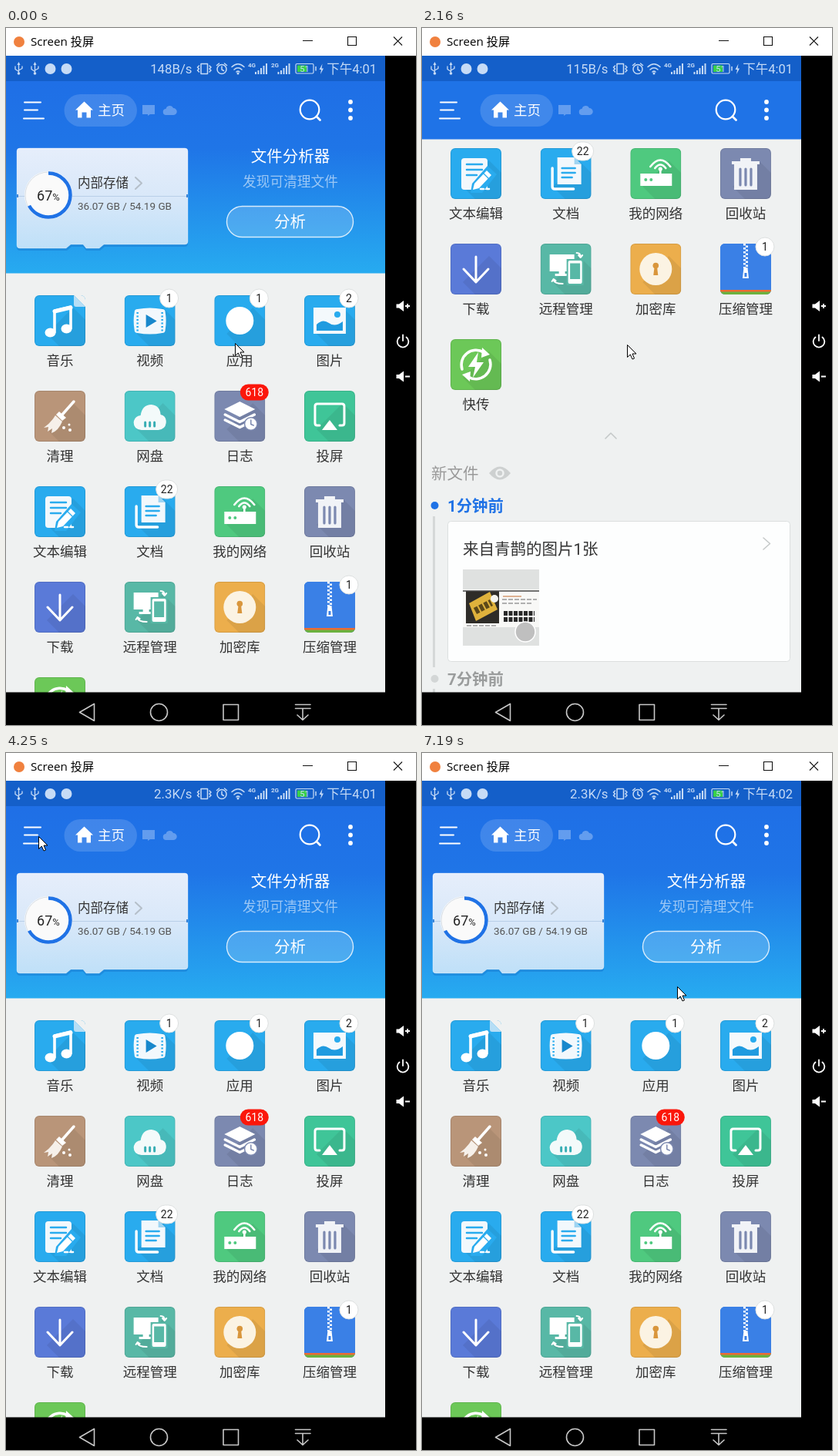
Animation of 532 by 905 pixels, one loop 8.03 s. Source, as an HTML page:

```html
<!DOCTYPE html>
<html lang="zh-CN">
<head>
<meta charset="utf-8">
<title>Screen 投屏</title>
<style>
html, body { margin: 0; width: 100%; height: 100%; overflow: hidden; background: #000; }
svg { display: block; font-family: Roboto, "Noto Sans CJK SC", "Noto Sans CJK", sans-serif; }
.line { fill: none; stroke-linecap: round; stroke-linejoin: round; }
.mid { text-anchor: middle; }
.end { text-anchor: end; }
.title { font-family: "Open Sans", "Noto Sans CJK SC", "Noto Sans CJK", sans-serif; }
</style>
</head>
<body>
<svg width="532" height="905" viewBox="0 0 532 905">
  <defs>
    <linearGradient id="sky" x2="0" y2="1">
      <stop offset="0" stop-color="#1f6fe6"/><stop offset=".35" stop-color="#1f75e7"/><stop offset="1" stop-color="#27abf0"/>
    </linearGradient>
    <linearGradient id="disk" x2="0" y2="1">
      <stop offset="0" stop-color="#e6eefb"/><stop offset=".48" stop-color="#d9e8f9"/><stop offset="1" stop-color="#bfe0f8"/>
    </linearGradient>
    <linearGradient id="cover" x2=".35" y2="1">
      <stop offset="0" stop-color="#1f6be2"/><stop offset=".5" stop-color="#2589e9"/><stop offset="1" stop-color="#35b3f2"/>
    </linearGradient>
    <linearGradient id="bar"><stop offset="0" stop-color="#777"/><stop offset=".5" stop-color="#b4b4b4"/><stop offset="1" stop-color="#777"/></linearGradient>
    <clipPath id="view"><path d="M0 69H492V863H0z"/></clipPath>
    <clipPath id="tile"><rect width="66" height="66" rx="6"/></clipPath>
  </defs>

  <rect width="532" height="905"/>
  <rect y="36" width="492" height="827" fill="#eff1f1"/>

  <g clip-path="url(#view)">
    <g id="page">
      <rect y="69" width="492" height="249.500" fill="url(#sky)"/>
      <path id="sheen" d="M0 144H492V163Q420 178 330 176Q140 172 0 146z" fill="#fff" opacity=".12"/>
      <path d="M18 158H232Q236 158 236 162V280Q236 284 232 284H128L122 289H104L100 284H85L79 289H18Q14 289 14 285V162z" fill="#0c5cb8" opacity=".3"/>
      <path d="M18 156H232Q236 156 236 160V277Q236 281 232 281H127L121 286H104L100 281H84L78 286H18Q14 286 14 282V160Q14 156 18 156z" fill="url(#disk)" stroke="#fff" stroke-opacity=".3"/>
      <path d="M16 218.500H234" stroke="#b9cfe8"/>
      <path d="M14 216v4h2v-4zM234 216v4h2v-4z" fill="#3d86d8"/>
      <circle cx="55" cy="217" r="31" fill="#fafafa"/>
      <circle cx="55" cy="217" r="30" fill="none" stroke="#d8dfe6"/>
      <circle cx="55" cy="217" r="28.500" fill="none" stroke="#1f72e6" stroke-width="4.500" pathLength="100" stroke-dasharray="67 100" transform="rotate(-90 55 217)"/>
      <text x="55" y="223.500" class="mid" font-size="18" fill="#222">67<tspan font-size="13">%</tspan></text>
      <text x="93" y="207" font-size="16.500" fill="#333">内部存储</text>
      <path d="M168 194l8 7.500-8 7.500" class="line" stroke="#b5bfc9" stroke-width="2"/>
      <text x="93" y="236" font-size="13.500" fill="#555">36.07 GB / 54.19 GB</text>
      <g fill="#fff" class="mid">
        <text x="369" y="173.500" font-size="20.500">文件分析器</text>
        <text x="369" y="205.500" font-size="17.700" opacity=".55">发现可清理文件</text>
        <rect x="286.500" y="231.500" width="164" height="40" rx="20" fill-opacity=".18" stroke="#fff" stroke-opacity=".8" stroke-width="1.400"/>
        <text x="368.500" y="258.500" font-size="20.500">分析</text>
      </g>
      <g id="grid"></g>
      <path d="M238 972l7-7 7 7" class="line" stroke="#c4c8c8" stroke-width="1.600"/>
      <text x="12" y="1025" font-size="20.500" fill="#999">新文件</text>
      <path d="M87 1017Q101 1000 115 1017Q101 1034 87 1017z" fill="#cdd0d0"/>
      <circle cx="101" cy="1017" r="4.500" fill="#cdd0d0" stroke="#eff1f1" stroke-width="2.500"/>
      <path d="M15.500 1073V1269M15.500 1297V1400" stroke="#d5d8d8" stroke-width="3"/>
      <circle cx="16.500" cy="1059" r="5" fill="#1f72e6"/>
      <circle cx="16.500" cy="1284" r="5" fill="#d3d6d6"/>
      <g font-size="20.400" font-weight="700">
        <text x="33" y="1066.500" fill="#1f72e6">1分钟前</text>
        <text x="33" y="1291.500" fill="#9a9c9c">7分钟前</text>
      </g>
      <rect x="33.500" y="1079.500" width="444" height="182" rx="4" fill="#fdfefe" stroke="#dcdfdf"/>
      <text x="53" y="1122.500" font-size="20.500" fill="#333">来自青鹊的图片1张</text>
      <path d="M443 1101l8.500 7.500-8.500 7.500" class="line" stroke="#c6caca" stroke-width="1.600"/>
      <g transform="translate(53 1142)">
        <path d="M0 0H99V99H0z" fill="#dfe1e0"/>
        <path d="M0 26H99V75H0z" fill="#f8f8f6"/>
        <path d="M4 28H47V70H4z" fill="#2e2c28"/>
        <path d="M8 44l27-15 10 23-28 15z" fill="#dfb23c"/>
        <path d="M16 54l21-11" stroke="#5c4819" stroke-width="9" stroke-dasharray="5 2"/>
        <circle cx="41" cy="38" r="5" fill="#f3f3ee"/>
        <path d="M0 28H99" stroke="#444" stroke-width="1.500"/>
        <path d="M5 73H45M51 39H96M51 44H90" stroke="#999" stroke-width="1.500" stroke-dasharray="6 2"/>
        <path d="M52 35H76" stroke="#d69b72" stroke-width="1.500"/>
        <path d="M53 57H93M53 65H93" stroke="#292929" stroke-width="6" stroke-dasharray="5 1.500"/>
        <circle cx="81" cy="81" r="13" fill="#bfbfbf" stroke="#fff" stroke-width="1.500"/>
      </g>
    </g>

    <rect id="solid" y="69" width="492" height="75.500" fill="#1f73e7"/>
    <g stroke="#fff" stroke-width="2" class="line">
      <path d="M24 96.500H45M24 106.500H41M23 117.500H49"/>
      <circle cx="394" cy="106" r="12.300" stroke-width="2.200"/><path d="M403 115l4.500 4.500" stroke-width="2.800"/>
    </g>
    <g fill="#fff">
      <rect x="75.500" y="86" width="94.500" height="42" rx="21" opacity=".15"/>
      <path d="M101.500 95.500L113 106.500H110V116.500H104.500V109.500H98.500V116.500H93V106.500H90z"/>
      <text x="119" y="113" font-size="17.500">主页</text>
      <path d="M177 100H193V112H187L184 114V112H177zM208 113a4 4 0 0 1-.500-8a5 5 0 0 1 9.500-1a4.500 4.500 0 0 1 .500 9z" opacity=".3"/>
      <circle cx="447" cy="96" r="2.900"/><circle cx="447" cy="106.500" r="2.900"/><circle cx="447" cy="117" r="2.900"/>
    </g>
    <rect id="dim" y="69" width="492" height="794"/>

    <g id="drawer">
      <rect y="69" width="393" height="794" fill="#f3f5f5"/>
      <g>
        <rect y="69" width="393" height="137" fill="url(#cover)"/>
        <path d="M180 104L228 69H305L222 136z" fill="#1761cf" opacity=".28"/>
        <path d="M0 69H60L118 178L0 206z" fill="#fff" opacity=".07"/>
        <path d="M0 206L393 118V206z" fill="#5cd0fb" opacity=".16"/>
        <path d="M352 69Q372 92 393 90" class="line" stroke="#1761cf" opacity=".6"/>
        <circle cx="39" cy="137.500" r="27" fill="#fff" fill-opacity=".05" stroke="#7cc6f6"/>
        <rect x="26" y="127" width="26.500" height="22" rx="3" fill="#fff"/>
        <path d="M27 130l12.200 9 12.200-9" class="line" stroke="#2580e6" stroke-width="2"/>
      </g>
      <g id="menu"></g>
      <rect x="386.500" y="71" width="6.500" height="504" rx="3" fill="url(#bar)" stroke="#686868" stroke-width=".7"/>
    </g>
  </g>

  <rect y="36" width="492" height="33" fill="#145fc9"/>
  <g fill="#c6dbf6" font-size="16.800">
    <text id="speed" x="241.500" y="59" class="end"></text>
    <text id="clock" x="481" y="59" class="end" font-size="16.500"></text>
    <g id="usb"><path d="M16.500 46V59M12 50V53.500L16.500 56.500M21 50V52.500L16.500 55" class="line" stroke="#c6dbf6" stroke-width="1.300"/><path d="M14.500 48l2-4 2 4z"/><circle cx="16.500" cy="59" r="1.800"/></g>
    <use href="#usb" x="21"/>
    <circle cx="57.500" cy="53" r="7"/><circle cx="78.500" cy="53" r="7"/>
    <g class="line" stroke="#c6dbf6" stroke-width="1.500">
      <path d="M253 46.500H261.500V59.500H253zM250.500 49l-2 2 2 2-2 2 2 2M264 49l2 2-2 2 2 2-2 2"/>
      <circle cx="280" cy="53.500" r="6"/><path d="M280 50V54l2.500 1.500M273.500 48.500l3-2.500M286.500 48.500l-3-2.500"/>
      <path d="M293 50.500Q301 43 309 50.500M296 54Q301 49.500 306 54M299 57Q301 55.300 303 57"/>
      <rect x="376" y="46.500" width="23" height="12.500" rx="1.500" stroke-width="1.200"/><path d="M402 50.500V55"/>
    </g>
    <circle cx="301" cy="59" r="1.500"/>
    <path id="bars" d="M323 57h2v3h-2zM326.500 55h2v5h-2zM330 52h2v8h-2zM333.500 49h2v11h-2zM337 46h2v14h-2z"/>
    <use href="#bars" x="29.500"/>
    <text x="314" y="51" font-size="8" font-weight="700">4G</text><text x="344" y="51" font-size="8" font-weight="700">2G</text>
    <rect x="378" y="48.500" width="12" height="8.500" fill="#39d04a"/>
    <text x="387.500" y="57" font-size="11" class="mid">51</text>
    <path d="M410.500 46.500l-4 7.500h2.500l-1 6 4-7.500h-2.500z"/>
  </g>

  <rect y="862.500" width="532" height="42.500"/>
  <g class="line" stroke="#c8c8c8" stroke-width="1.600">
    <path d="M114.500 877.500V899.500L95.500 888.500zM282 878.500H301.500V898.500H282zM375.500 878.500H395M375.500 883.500H395M385 884V898M378 892l7 6.500 7-6.500"/>
    <circle cx="198.500" cy="888.500" r="11"/>
  </g>
  <g fill="#fff">
    <path id="horn" d="M506.500 358.500h3.500l6-4.500v14l-6-4.500h-3.500z"/><use href="#horn" y="91.500"/>
    <path d="M518 361H524M521 358V364M518 452.500H524" stroke="#fff" stroke-width="2"/>
    <path d="M510.500 401.500a7.300 7.300 0 1 0 9 0M515 398.500V406" class="line" stroke="#fff" stroke-width="1.800"/>
  </g>
  <rect width="532" height="36" fill="#fff"/>
  <circle cx="17" cy="18" r="7" fill="#f0813f"/>
  <text class="title" x="32" y="23" font-size="15.200">Screen 投屏</text>
  <path d="M385 16.500H398M443.500 11.500H454.500V22.500H443.500zM503 11.500L514 22.500M514 11.500L503 22.500" fill="none" stroke="#111" stroke-width="1.100"/>
  <path id="cursor" d="M.5.500V16.500L4.300 13L7 19L9.500 18L7 12H12z" fill="#fff" stroke="#000"/>
</svg>

<script>
const $ = id => document.getElementById(id);
const stroke = (d, w = 3, c = '#fff') => `<path d="${d}" class="line" stroke="${c}" stroke-width="${w}"/>`;
const fill = (d, c = '#fff') => `<path d="${d}" fill="${c}"/>`;
const dot = (x, y, r, c = '#fff') => `<circle cx="${x}" cy="${y}" r="${r}" fill="${c}"/>`;
const blue = '#29abee', slate = '#7c89b0', teal = '#58b8a6';

const art = {
  music: fill('M51 0H66V15z', '#eff1f1') + fill('M51 0L66 15H54Q51 15 51 12z', '#b5def6') +
    stroke('M26 48V20L47 15V43', 3.6) + stroke('M26 21L47 16', 5) +
    '<ellipse cx="20.500" cy="48.500" rx="7" ry="6" fill="#fff"/><ellipse cx="41.500" cy="43.500" rx="7" ry="6" fill="#fff"/>',
  video: fill('M17 18Q33 15 49 18Q53 18 53 22Q55 33 53 45Q53 49 49 49Q33 52 17 49Q13 49 13 45Q11 33 13 22Q13 18 17 18z', '#f2f8fc') +
    '<path d="M17 22V47M49 22V47" stroke="#29abee" stroke-width="2.500" stroke-dasharray="2 2.500"/>' + fill('M28 25L42 33.500L28 42z', '#1888cc'),
  app: dot(33, 33, 18),
  photo: fill('M12 16H54V50H12z', '#f4f9fc') + fill('M16 38Q24 30 32 36T50 34V46H16z', '#1f9be0') + dot(43, 25, 4, blue),
  broom: stroke('M51 14L36 31', 3.5) + fill('M32 27L41 35L36 39L28 31z') + fill('M27 32L36 40Q31 52 22 55L23 49L17 53L18 47L12 48Q21 42 27 32z', '#f6f0ea') + dot(38, 48, 2) + dot(45, 44, 1.5) + dot(46, 51, 2),
  cloud: fill('M22 51Q12 50 12 41Q13 33 21 32Q23 18 35 18Q46 19 47 31Q55 33 54 42Q53 50 44 51z', '#f3fafa') + stroke('M27 41V46M33 41V46M39 41V46', 3, '#37aeb4'),
  layers: fill('M33 14L53 24L33 34L13 24z') + stroke('M14 31L33 40.500L52 31M14 38L33 47.500L42 43', 3.5) + dot(47.5, 43, 9, slate) + dot(47.5, 43, 7.5) + stroke('M47.500 38V43.500L51 45', 1.5, slate),
  cast: stroke('M20 45H17Q14 45 14 42V20Q14 17 17 17H49Q52 17 52 20V42Q52 45 49 45H46', 3) + fill('M33 38L43 51H23z'),
  edit: fill('M18 13H44Q48 13 48 17V54H18Q14 54 14 50V17Q14 13 18 13z', '#f2f8fc') + stroke('M21 21H41M21 28H41M21 35H34', 2.5, blue) +
    fill('M48 23L60 34L41 58H26L28 46z', blue) + fill('M47 29L53 35L37 52L29 54L31 46z') + stroke('M43 33L49 39', 1.3, blue) + stroke('M39 53H43M47 53H50', 2.5),
  docs: fill('M22 12H44L53 21V47H22z', '#f2f8fc') + fill('M44 12V21H53z', '#9fd4f2') + stroke('M15.500 26V50Q15.500 53 18.500 53H43', 3.4) + stroke('M28 26H45M28 32H45M28 38H41', 2.5, blue),
  router: fill('M13 33H54V49H13z') + dot(20, 41, 2, '#4fc97f') + dot(27, 41, 2, '#4fc97f') + stroke('M39 33V28', 2.6) + dot(39, 27, 2.6) + stroke('M32 26Q39 17 46 26M26 24Q39 7 52 24', 2.6),
  bin: fill('M26 13H40V17H51V21H48V54H18V21H15V17H26z', '#f1f3f7') + stroke('M26 27V48M33 27V48M40 27V48', 3.2, slate),
  down: stroke('M33 17V49M17 33L33 50L49 33', 3),
  remote: fill('M12 14H44V36H12zM24 36H32V39H36V42H19V39H24z') + fill('M34 20H56V54H34z', teal) +
    '<rect x="36" y="22" width="18" height="30" rx="2" fill="#fff"/>' + fill('M38.500 25.500H51.500V46H38.500z', teal) + stroke('M47 12Q52 12 52 17M49.500 15L52 18L54.500 15M29 52Q18 52 17 47M15 49L17 46L20 48', 2),
  vault: dot(33, 33, 21, '#fbf3e3') + dot(33, 28.5, 3.8, '#d9963c') + fill('M31.300 30H34.700L36 41H30z', '#d9963c'),
  zip: fill('M0 60H66V66H0z', '#6bb23f') + fill('M0 60H66V62.500H0z', '#ec6a35') + fill('M0 0H66V60H0z', '#3a80e6') +
    '<path d="M31.500 0V32" stroke="#fff" stroke-width="3" stroke-dasharray="2.500 2.500"/><path d="M34.500 2.500V32" stroke="#fff" stroke-width="3" stroke-dasharray="2.500 2.500"/>' +
    fill('M30.500 31H35.500L37 45H29z') + fill('M31.500 38H34.500V43H31.500z', '#3a80e6'),
  quick: stroke('M15 39A19 19 0 0 1 43 17M51 27A19 19 0 0 1 23 49', 3.5) + fill('M41 11L51 20L40 24zM25 55L15 46L26 42z') + fill('M36 17L23 36H32L29 50L43 30H34z'),
};

const tiles = [
  ['音乐', blue, 'music'], ['视频', blue, 'video', 1], ['应用', blue, 'app', 1], ['图片', blue, 'photo', 2],
  ['清理', '#b99579', 'broom'], ['网盘', '#4cc7c7', 'cloud'], ['日志', slate, 'layers', 618], ['投屏', '#3fc598', 'cast'],
  ['文本编辑', blue, 'edit'], ['文档', blue, 'docs', 22], ['我的网络', '#4fc97f', 'router'], ['回收站', slate, 'bin'],
  ['下载', '#5a7ad8', 'down'], ['远程管理', teal, 'remote'], ['加密库', '#ecae4c', 'vault'], ['压缩管理', '#3a80e6', 'zip', 1],
  ['快传', '#6cc858', 'quick'],
];

function badge(n) {
  if (!n) return '';
  const hot = n > 99, w = hot ? 37 : n > 9 ? 28 : 24, h = hot ? 21 : 24;
  const x = hot ? 52 : n > 9 ? 55 : 58, y = hot ? 2 : 4;
  return `<rect x="${x - w / 2}" y="${y - h / 2}" width="${w}" height="${h}" rx="${h / 2}" fill="${hot ? '#fb170b' : '#fff'}" stroke="${hot ? 'none' : '#dde0e0'}"/>
    <text x="${x}" y="${y + 5}" class="mid" font-size="14" fill="${hot ? '#fff' : '#222'}">${n}</text>`;
}

$('grid').innerHTML = tiles.map(([label, color, key, n], i) => `
  <g transform="translate(${37 + i % 4 * 116.65} ${347 + Math.floor(i / 4) * 124})">
    <g clip-path="url(#tile)"><path d="M0 0H66V66H0z" fill="${color}"/>
    <path d="M50 16L66 32V66H32L16 50z" opacity=".07"/>
    <rect x=".5" y=".5" width="65" height="65" rx="6" fill="none" stroke="#000" stroke-opacity=".1"/>${art[key]}</g>
    ${badge(n)}<text x="33" y="91" class="mid" font-size="17.500" fill="#333">${label}</text>
  </g>`).join('');

// Menu icons sit around their own centre.
const grey = '#7b7b7b', paper = '#f3f5f5';
const star = Array.from({ length: 10 }, (_, i) => {
  const r = i % 2 ? 6 : 13.5, a = i * Math.PI / 5;
  return [r * Math.sin(a), 1 - r * Math.cos(a)].map(v => v.toFixed(1));
}).join('L');
const gear = [0, 60, 120].map(a => `<rect x="-4.500" y="-14" width="9" height="28" rx="2" fill="${grey}" transform="rotate(${a})"/>`).join('');
const menu = [
  ['设置', gear + dot(0, 0, 10.5, grey) + dot(0, 0, 4.5, paper)],
  ['收藏', fill(`M${star}z`, grey)],
  ['本地', `<rect x="-8.500" y="-14" width="17" height="28" rx="2.500" fill="${grey}"/>` + fill('M-6.500 -10H6.500V8H-6.500z', paper) + dot(0, 11, 1.4, paper)],
  ['库', fill('M0 -14L13 -7L0 0L-13 -7z', grey) + stroke('M-12 -1.500L0 4.500L12 -1.500M-12 3L0 9L12 3M-12 7.500L0 13L12 7.500', 2.3, grey)],
  ['网络', fill('M-14 0H14V11H-14z', grey) + dot(-9, 5.5, 1.5, paper) + dot(-4, 5.5, 1.5, paper) + stroke('M5 0V-4M0 -6Q5 -11 10 -6M-5 -7Q5 -18 13 -7', 2.2, grey)],
  ['工具', stroke('M-2 -2L10 10', 6.5, grey) + dot(-5, -5, 8.5, grey) + fill('M-15 -11L-10 -15L-3 -7L-7 -3z', paper)],
  ['回收站', fill('M-4 -14H4V-11H13V-8H-13V-11H-4zM-10.500 -6H10.500V13H-10.500z', grey) + stroke('M-5 -3V9M0 -3V9M5 -3V9', 2, paper)],
  ['文件夹关联应用', fill('M-12 -13H4L10 -7V13H-12z', grey) + fill('M4 -13V-7H10z', '#bbb') + fill('M-3 9Q5 -1 14 9Q5 19 -3 9z', paper) + fill('M-1 9Q5 2 12 9Q5 16 -1 9z', grey) + dot(5.5, 9, 2, paper)],
];
$('menu').innerHTML = menu.map(([label, icon], i) => {
  const side = i > 5
    ? `<rect x="323" y="-13" width="50" height="25" rx="12.500" fill="#1f72e6"/>` + dot(360.5, -.5, 11.5, '#fdfdfd')
    : i ? stroke('M357.500 -5L365 3L372.500 -5', 1.5, '#c5c9c9') : '';
  return `<g transform="translate(0 ${254.500 + i * 82.400})"><g transform="translate(39)">${icon}</g>
    <text x="74" y="7.800" font-size="20.500" fill="#333">${label}</text>${side}</g>`;
}).join('');

// Progress of a span that advances in n held steps.
const span = (t, from, to, n) => t < from ? 0 : Math.min(1, (Math.floor((t - from) / (to - from) * (n - 1) + .15) + 1) / n);
const out = (p, k) => 1 - (1 - p) ** k;
const smooth = p => p * p * (3 - 2 * p);

const moves = [
  [70, 520, 7, 265, 413], [1760, 1840, 2, 266, 411], [3500, 4250, 11, 42, 108],
  [5340, 5960, 9, 485, 303], [6110, 6190, 2, 464, 310], [6700, 7110, 6, 331, 303],
];

function draw(now) {
  const t = now % 8030;

  const lift = 376.3 * out(span(t, 920, 1690, 11), 3) + 69.2 * out(span(t, 1760, 2540, 11), 3);
  const scroll = Math.round(lift * (1 - out(span(t, 2620, 3410, 11), 4)));
  $('page').setAttribute('transform', `translate(0 ${-scroll})`);
  $('solid').style.display = t >= 920 && t < 3500 ? '' : 'none';
  $('sheen').style.display = t >= 2620 && t < 3500 ? '' : 'none';

  const open = out(span(t, 4500, 5190, 10), 2.06) - out(span(t, 6340, 7110, 11), 2.5);
  $('drawer').setAttribute('transform', `translate(${Math.round(393 * (open - 1))} 0)`);
  $('drawer').style.display = open > 0 ? '' : 'none';
  $('dim').setAttribute('opacity', .6 * open);

  let x = 297, y = 409;
  for (const [from, to, n, tx, ty] of moves) {
    const p = smooth(span(t, from, to, n));
    x += (tx - x) * p;
    y += (ty - y) * p;
  }
  $('cursor').setAttribute('transform', `translate(${Math.round(x)} ${Math.round(y)})`);

  $('speed').textContent = t < 1000 ? '148B/s' : t < 3800 ? '115B/s' : '2.3K/s';
  $('clock').textContent = t < 6800 ? '下午4:01' : '下午4:02';
}

function tick() {
  draw(performance.now());
  requestAnimationFrame(tick);
}
tick();
</script>
</body>
</html>
```
